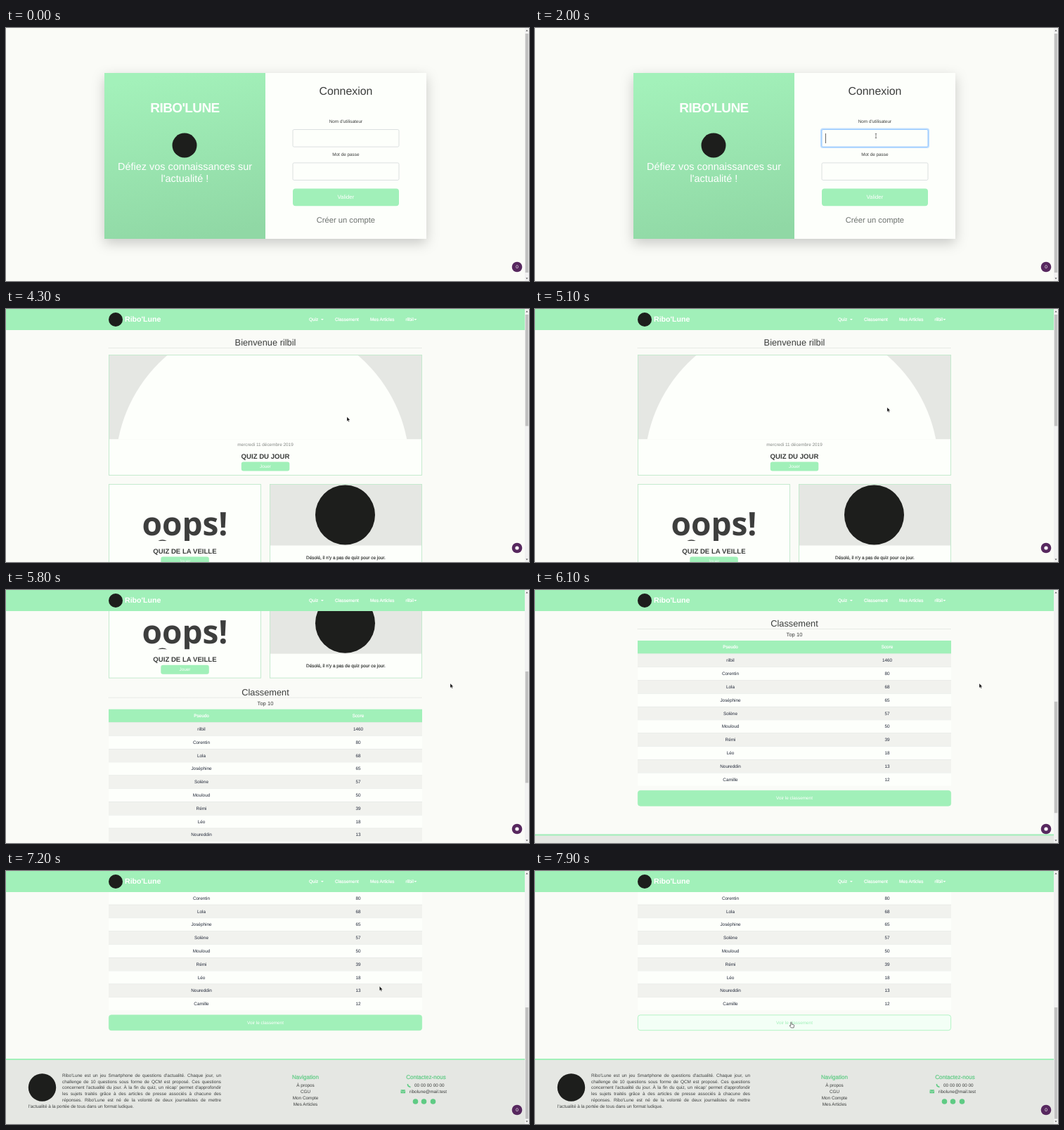
These frames come from a looping animation (744x360 px, 8000 ms). An HTML page:

```html
<!DOCTYPE html>
<html lang="fr">
<head>
<meta charset="utf-8">
<title>Ribo'Lune</title>
<style>
  html, body { margin: 0; width: 100%; height: 100%; overflow: hidden; background: #fafbf7; }
  svg { display: block; width: 100vw; height: 100vh; }
  svg, p { font-family: "Liberation Sans", Arial, sans-serif; text-rendering: geometricPrecision; }
  p { margin: 0; font-size: 6.4px; line-height: 8.8px; text-align: justify; color: #3c3f3e; }
  p i { float: left; width: 48px; height: 40px; }
  .card { filter: drop-shadow(0 6px 9px rgba(0, 0, 0, .2)); }
  .bold { font-weight: bold; }
  .firm { stroke: currentColor; stroke-width: .2px; }
  .rule { stroke: #d5d8d3; stroke-width: .8; stroke-dasharray: 1.2 .8; }
</style>
</head>
<body>
<svg id="stage" viewBox="0 0 744 360"></svg>
<script>
const LOOP = 8000, LOGIN_END = 4300;
const GREEN = '#a1f0b9', ACCENT = '#5fcb84', INK = '#3b3d3c', LOGO = '#1d1e1c', PAPER = '#fdfffb', GREY = '#e5e7e3';
const BRAND = "Ribo'Lune", USER = 'rilbil';
const RANKING = [[USER, 1460], ['Corentin', 80], ['Lola', 68], ['Joséphine', 65], ['Solène', 57],
  ['Mouloud', 50], ['Rémi', 39], ['Léo', 18], ['Noureddin', 13], ['Camille', 12]];

const text = (x, y, size, fill, content, { anchor = 'middle', cls = '', id = '' } = {}) =>
  `<text id="${id}" x="${x}" y="${y}" font-size="${size}" fill="${fill}" color="${fill}" text-anchor="${anchor}" class="${cls}">${content}</text>`;
const rect = (x, y, w, h, fill, attrs = '') =>
  `<rect x="${x}" y="${y}" width="${w}" height="${h}" fill="${fill}" ${attrs}/>`;
const circle = (x, y, r, fill, attrs = '') => `<circle cx="${x}" cy="${y}" r="${r}" fill="${fill}" ${attrs}/>`;
const rule = y => `<path class="rule" d="M146 ${y}H592"/>`;
const panel = (x, y, w, h) => rect(x, y, w, h, PAPER, 'stroke="#bfe8cb" stroke-width=".9"');
const playButton = (x, y) => rect(x, y, 68.5, 13, GREEN, 'rx="3"') + text(x + 34.2, y + 8.7, 6.4, '#fff', 'Jouer');

const field = (y, id) => `
  ${rect(407, y - 1, 153, 26.6, 'none', `id="${id}Glow" rx="2.5" stroke="#bfdeff" stroke-width="2"`)}
  ${rect(408, y, 151, 24.6, PAPER, `id="${id}Box" rx="1.8" stroke-width=".8"`)}
  ${text(413, y + 16.8, 12.8, '#495057', '', { anchor: 'start', id: id + 'Text' })}`;

const login = `<g id="login">
  <g class="card">${rect(140, 64, 458, 236, PAPER)}</g>
  ${rect(140, 64, 229, 236, 'url(#shade)')}
  ${text(254.5, 119.5, 19, '#fff', BRAND.toUpperCase(), { cls: 'bold' }).replace('<text', '<text letter-spacing="-.6"')}
  ${circle(254, 167, 17.5, LOGO)}
  ${text(254.5, 202, 14.45, '#fff', 'Défiez vos connaissances sur')}
  ${text(254.5, 219.3, 14.45, '#fff', "l'actualité !")}
  ${text(483.4, 95.3, 15.9, INK, 'Connexion')}
  ${text(483.4, 134.8, 6.4, INK, "Nom d'utilisateur")}
  ${field(144.5, 'name')}
  ${text(483.4, 182.2, 6.4, INK, 'Mot de passe')}
  ${field(191.9, 'pass')}
  ${rect(408, 228.4, 151, 24.8, GREEN, 'rx="4"')}
  ${text(483.4, 243.3, 7.9, '#fff', 'Valider')}
  ${text(483.4, 277, 11.2, '#6c716e', 'Créer un compte')}
  ${rect(0, 0, .8, 14, '#444', 'id="caret"')}
</g>`;

const welcome = `
  ${text(369, 52, 12.8, INK, 'Bienvenue ' + USER)}${rule(55.5)}
  ${panel(146.5, 65.5, 445, 171)}
  <g clip-path="url(#banner)">${rect(147, 66, 444, 119.5, GREY)}${circle(365, 225, 209, PAPER)}</g>
  ${text(369, 195, 6.4, '#858886', 'mercredi 11 décembre 2019')}
  ${text(369, 212.8, 9.6, INK, 'QUIZ DU JOUR', { cls: 'bold' })}${playButton(334.8, 217.5)}
  ${panel(146.5, 249.5, 216, 121.5)}
  <g clip-path="url(#oops)">
    <text x="254.5" y="322" font-family="Open Sans, sans-serif" font-weight="bold" font-size="46" fill="#3d3e3d" text-anchor="middle">oops!</text>
    <path d="M216 331q6.500-4 13 0" fill="none" stroke="#3d3e3d" stroke-width="1.500"/>
  </g>
  ${text(254.5, 347.8, 9.6, INK, 'QUIZ DE LA VEILLE', { cls: 'bold' })}${playButton(220.3, 352.5)}
  ${panel(375.5, 249.5, 216, 121.5)}
  ${rect(376, 250, 215, 86.5, GREY)}${circle(482.5, 293, 42.5, LOGO)}
  ${text(483.5, 355.6, 6.4, INK, "Désolé, il n'y a pas de quiz pour ce jour.", { cls: 'firm' })}`;

const rankRow = ([name, score], i) => {
  const y = 90.7 + i * 18.8;
  return rect(146, y, 446, 18.8, i % 2 ? PAPER : '#f1f2ee') + rect(146, y, 446, .5, '#dfe3e0')
    + text(278, y + 11.7, 6.4, '#212738', name) + text(501, y + 11.7, 6.4, '#212738', score);
};
const ranking = `<g transform="translate(0 343.5)">
  ${text(369, 52.4, 12.8, INK, 'Classement')}${rule(55.5)}
  ${text(369, 66.4, 7.6, INK, 'Top 10')}
  ${rect(146, 72, 446, 18.7, GREEN)}
  ${text(278, 83.3, 6.4, '#fff', 'Pseudo', { cls: 'firm' })}${text(501, 83.3, 6.4, '#fff', 'Score', { cls: 'firm' })}
  ${RANKING.map(rankRow).join('')}
  ${rect(146.4, 285.4, 445.2, 21.8, GREEN, `id="more" rx="3.5" stroke="${GREEN}" stroke-width=".8"`)}
  ${text(369, 298.4, 6.4, '#fff', 'Voir le classement', { id: 'moreText' })}
</g>`;

const links = ['À propos', 'CGU', 'Mon Compte', 'Mes Articles'];
const footer = `<g transform="translate(0 424)">
  ${rect(0, 267, 738, 93, GREY)}${rect(0, 267, 738, 2, GREEN)}
  ${circle(51.5, 308, 19.7, LOGO)}
  <foreignObject x="32" y="287.900" width="274" height="60"><p><i></i>${BRAND} est un jeu Smartphone de questions
    d'actualité. Chaque jour, un challenge de 10 questions sous forme de QCM est proposé. Ces questions concernent
    l'actualité du jour. À la fin du quiz, un récap' permet d'approfondir les sujets traités grâce à des articles
    de presse associés à chacune des réponses. ${BRAND} est né de la volonté de deux journalistes de mettre
    l'actualité à la portée de tous dans un format ludique.</p></foreignObject>
  ${text(426, 295.6, 8.1, ACCENT, 'Navigation', { cls: 'firm' })}
  ${links.map((name, i) => text(426, 307.3 + i * 8.8, 6.4, INK, name)).join('')}
  ${text(597.5, 295.6, 8.1, ACCENT, 'Contactez-nous', { cls: 'firm' })}
  <path d="M571.500 303q-.5 3.500 4 4.500" fill="none" stroke="${ACCENT}" stroke-width="1.500"/>
  ${text(581, 307.3, 6.4, INK, '00 00 00 00 00', { anchor: 'start' })}
  ${rect(561.5, 311.3, 6.6, 5, ACCENT, 'rx=".6"')}<path d="M561.500 312.500l3.300 2 3.300-2" fill="none" stroke="${GREY}" stroke-width=".6"/>
  ${text(574, 316.1, 6.4, INK, 'ribolune@mail.test', { anchor: 'start' })}
  ${[582.5, 594.5, 607.5].map(x => circle(x, 328, 3.8, ACCENT)).join('')}
</g>`;

const navItem = (x, label) => text(x, 17.2, 6.4, '#fff', label, { anchor: 'start', cls: 'firm' });
const dropArrow = x => `<path d="M${x} 14h3.800l-1.900 2z" fill="#fff"/>`;
const navbar = `${rect(0, 0, 738, 30, GREEN)}${circle(156, 15, 10, LOGO)}
  ${text(169, 18, 10.6, '#fff', BRAND, { anchor: 'start', cls: 'bold' })}
  ${navItem(431, 'Quiz')}${dropArrow(448)}${navItem(468, 'Classement')}${navItem(518, 'Mes Articles')}
  ${navItem(568.5, USER)}${dropArrow(580.5)}`;

const chrome = `${rect(738, 0, 6, 360, '#f1f1f1')}${rect(738.8, 8, 4.4, 340, '#c1c1c1', 'id="thumb"')}
  <path d="M739.500 4.500l1.500-2 1.500 2zM739.500 355.500l1.500 2 1.500-2z" fill="#555"/>
  ${circle(727, 340, 7.3, '#57285f')}${text(727, 342.3, 6.5, '#fff', '0', { id: 'count' })}
  ${circle(727, 340, 2.6, '#fff', 'id="dot"')}`;

const cursors = `<g id="cursor">
  <path id="arrow" d="M0 0v6.200l1.400-1.300 1 2.200 1-.4-1-2.100h2z" fill="#111" stroke="#fff" stroke-width=".3"/>
  <path id="beam" d="M-1.200-3h2.400M0-3v6M-1.200 3h2.400" fill="none" stroke="#555" stroke-width=".7"/>
  <path id="hand" d="M-.7 0q.7-.8 1.400 0v2.600l3 .7q.6.3.4 1.200l-.6 3h-3.700l-2.200-3q.2-.9 1.700 0z" fill="#fff" stroke="#222" stroke-width=".6"/>
</g>`;

const stage = document.getElementById('stage');
stage.innerHTML = `<defs>
    <linearGradient id="shade" x1=".4" y1="0" x2=".6" y2="1"><stop stop-color="#a3f1ba"/><stop offset="1" stop-color="#90d8a5"/></linearGradient>
    <clipPath id="banner">${rect(147, 66, 444, 119.5)}</clipPath>
    <clipPath id="oops">${rect(147, 250, 215, 80)}</clipPath>
  </defs>
  ${rect(0, 0, 744, 360, '#fafbf7')}${login}
  <g id="home"><g id="page">${welcome}${ranking}${footer}</g>${navbar}</g>${chrome}${cursors}`;

const $ = id => document.getElementById(id);
const set = (id, attrs) => Object.entries(attrs).forEach(([key, value]) => $(id).setAttribute(key, value));
const show = (id, visible) => set(id, { visibility: visible ? 'inherit' : 'hidden' });
const clamp = v => Math.max(0, Math.min(1, v));

// Each key is [time, ...values]; values are interpolated linearly.
function track(keys, t) {
  const next = keys.findIndex(key => key[0] > t);
  if (next < 0) return keys.at(-1).slice(1);
  if (next === 0) return keys[0].slice(1);
  const [a, b] = [keys[next - 1], keys[next]], p = (t - a[0]) / (b[0] - a[0]);
  return a.slice(1).map((v, i) => v + (b[i + 1] - v) * p);
}
const POINTER = [[500, 636, 268], [900, 485, 153.5], [5000, 485, 153.5], [5100, 500.5, 140], [5400, 632, 133],
  [6900, 632, 133], [7700, 364.5, 215.5]];
const SCROLL = [[5300, 0], [6000, 343.5], [6250, 343.5], [6500, 410.5], [6700, 424]];

const FOCUS = 900, TAB = 3300;
const nameKeys = [...USER].map((_, i) => 2300 + i * 160);
const passKeys = [...USER].map((_, i) => 3600 + i * 40);
const typed = (keys, t) => keys.filter(k => k <= t).length;

function drawLogin(t) {
  const active = t < FOCUS ? '' : t < TAB ? 'name' : 'pass';
  $('nameText').textContent = USER.slice(0, typed(nameKeys, t));
  $('passText').textContent = '•'.repeat(typed(passKeys, t));
  for (const id of ['name', 'pass']) {
    show(id + 'Glow', active === id);
    set(id + 'Box', { stroke: active === id ? '#80bdff' : '#d3d9da' });
  }
  const lastInput = Math.max(...[FOCUS, TAB, ...nameKeys, ...passKeys].filter(k => k <= t));
  show('caret', active && (t - lastInput) % 1000 < 500);
  if (active) set('caret', {
    x: 413.2 + $(active + 'Text').getComputedTextLength(),
    y: active === 'name' ? 150 : 197.2
  });
}

function drawHome(t, scroll) {
  set('page', { transform: `translate(0 ${-scroll})` });
  const hover = clamp((t - 7680) / 160);
  const mix = (from, to) => `rgb(${from.map((v, i) => Math.round(v + (to[i] - v) * hover))})`;
  const green = [161, 240, 185];
  set('more', { fill: mix(green, [243, 255, 246]) });
  set('moreText', { fill: mix([255, 255, 255], green) });
}

function draw(now) {
  const t = now % LOOP, atLogin = t < LOGIN_END;
  const [scroll] = track(SCROLL, t), [x, y] = track(POINTER, t);
  set('login', { display: atLogin ? 'inline' : 'none' });
  set('home', { display: atLogin ? 'none' : 'inline' });
  atLogin ? drawLogin(t) : drawHome(t, scroll);
  set('thumb', { y: 8 + scroll * .439, height: atLogin ? 340 : 158.5 });

  const counting = atLogin || t >= 6400;
  show('count', counting);
  show('dot', !counting);

  const shape = atLogin && t >= 850 ? 'beam' : t >= 7680 ? 'hand' : 'arrow';
  show('cursor', t >= 500);
  for (const id of ['arrow', 'beam', 'hand']) set(id, { display: id === shape ? 'inline' : 'none' });
  set('cursor', { transform: `translate(${x} ${y})` });
}

const start = performance.now();
function frame() {
  draw(performance.now() - start);
  requestAnimationFrame(frame);
}
frame();
</script>
</body>
</html>
```
